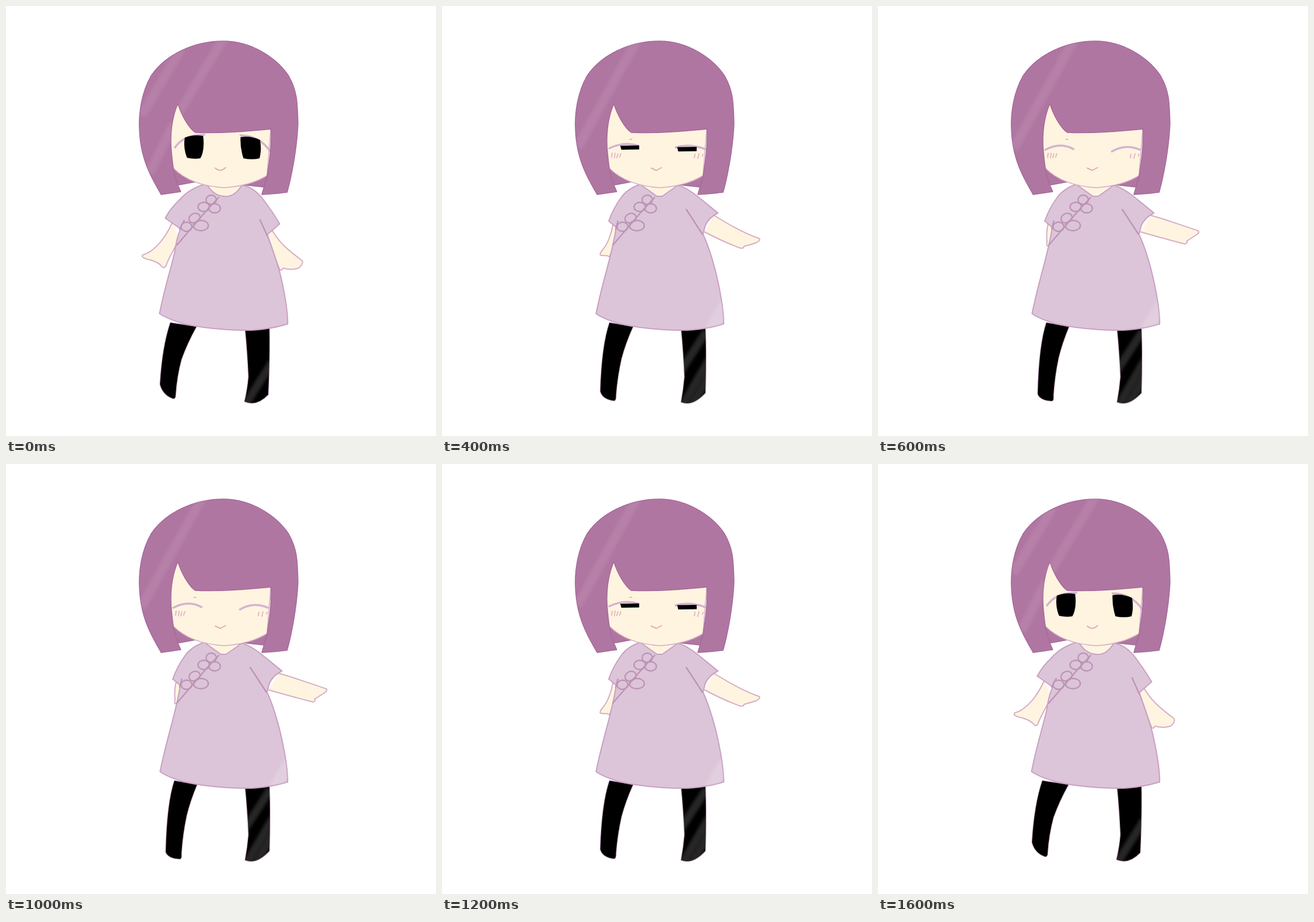
An HTML page that plays this animation: 748x748 px, repeating every 1800 ms.

```html
<!DOCTYPE html>
<html lang="en">
<head>
<meta charset="utf-8">
<title>Welcome gesture</title>
<style>
  html, body { margin: 0; width: 100%; height: 100%; overflow: hidden; background: #fff; }
  svg { display: block; width: 100vw; height: 100vh; }
  path, ellipse { stroke-linecap: round; stroke-linejoin: round; }
  .skin { fill: #fff4e0; stroke: #d5adc6; stroke-width: 2; }
  .leg { fill: #000; stroke: #c9a4c4; stroke-width: 2; paint-order: stroke; }
  .dress { fill: #dcc5d8; stroke: #c8a0c2; stroke-width: 2; }
  .hair { fill: #b076a2; stroke: #a56a99; stroke-width: 1.5; }
  .line { fill: none; stroke: #bd93b7; stroke-width: 2.3; }
  .lid { fill: none; stroke: #d3b3d0; stroke-width: 3.5; }
  .blush { fill: none; stroke: #e3b9c3; stroke-width: 2; }
  .shine { fill: none; stroke: #fff; stroke-linecap: butt; filter: url(#soft); }
</style>
</head>
<body>
<svg viewBox="0 0 748 748">
  <defs>
    <clipPath id="hairClip"><path data-part="hair"/></clipPath>
    <clipPath id="legClip"><path data-part="rightLeg"/></clipPath>
    <clipPath id="dressClip"><path data-part="dress"/></clipPath>
    <filter id="soft" x="-50%" y="-50%" width="200%" height="200%"><feGaussianBlur stdDeviation="2.500"/></filter>
  </defs>

  <path class="leg" data-part="leftLeg"/>
  <path class="leg" data-part="rightLeg"/>
  <g clip-path="url(#legClip)">
    <path class="shine" data-part="legShine" stroke-width="14" opacity=".15"/>
  </g>
  <path class="skin" data-part="leftArm"/>
  <path class="skin" data-part="rightArm"/>
  <path class="skin" style="stroke: none" d="M350 306H412V318L384 333H372L350 318Z"/>
  <path class="dress" data-part="dress"/>
  <g clip-path="url(#dressClip)">
    <path class="shine" data-part="dressShine" stroke-width="22" opacity=".16"/>
  </g>
  <path class="line" data-part="folds"/>
  <g class="line">
    <path d="M370 333Q354 350 345 360Q330 378 297 416"/>
    <ellipse cx="357" cy="337" rx="9" ry="8"/>
    <ellipse cx="344" cy="349.500" rx="10" ry="8"/>
    <ellipse cx="363" cy="352" rx="10" ry="8"/>
    <ellipse cx="328" cy="369" rx="10" ry="8" transform="rotate(-25 328 369)"/>
    <ellipse cx="314" cy="384" rx="9.500" ry="8"/>
    <ellipse cx="339" cy="382" rx="13" ry="9"/>
  </g>

  <path class="hair" d="M285 278L329 306L302 311L290 311ZM454 294L412 311L449 315Z"/>
  <path class="skin" style="stroke-width: 1.5" d="M291 282L284 215L299 165L461 208L454 295Q425 313 380 316Q322 313 291 282Z"/>
  <path class="lid" data-part="lids"/>
  <path data-part="eyes"/>
  <path class="blush" data-part="blush"/>
  <path class="blush" data-part="mouth" style="stroke: #e2abb9"/>
  <path class="hair" data-part="hair"/>
  <g clip-path="url(#hairClip)">
    <path class="shine" data-part="hairShine" stroke-width="16" opacity=".08"/>
  </g>
</svg>
<script>
const hair = "M270 328L304 323C298 310 293 295 291 282C284 240 286 200 299 170C305 190 318 212 329 220" +
  "C375 222 420 218 461 214C462 245 458 270 454 297L445 328Q468 327 489 324C496 300 506 250 508 205" +
  "C507 165 506 147 492 122C473 93 430 61 378 61C325 61 276 86 252 122C236 150 231 185 232 212C233 258 247 290 270 328Z";
const hem = "C278 543 300 550 310 553C350 562 420 568 455 561Q475 558 490 553";

const rest = {
  hair,
  leftLeg: "M286 551Q272 592 268 658Q273 677 291 683Q295 683 295 676Q297 645 305 615Q315 587 331 558Z",
  rightLeg: "M416 560Q420 600 422 645Q420 668 415 688Q436 697 456 676Q459 610 458 560Z",
  leftArm: "M289 377C279 400 260 427 238 433Q233 438 252 442Q266 446 273 455Q278 456 280 447Q288 430 302 405",
  rightArm: "M460 385C476 415 496 428 515 443Q518 448 509 456Q496 460 482 456Q478 463 475 456Q465 430 455 398",
  dress: "M345 310Q317 319 301 338Q286 352 277 369L304 388Q298 398 293 430C286 460 276 490 267 535" + hem +
    "Q490 520 476 462Q465 425 454 398L476 379Q465 360 455 347C440 324 425 313 410 312Q397 333 380 331Q362 330 352 314Z",
  folds: "M310 373L302 388M442 372L454 399",
  eyes: "M311 229Q326 223 343 226Q346 252 338 265Q327 267 315 264Q308 248 311 229Z" +
    "M408 228Q425 225 442 233Q445 250 441 265Q428 268 413 265Q407 246 408 228Z",
  lids: "M294 246Q310 223 345 224M408 225Q440 225 459 252",
  blush: "",
  mouth: "M364 282Q373 290 382 281",
  hairShine: "M382 50L298 190M304 75L236 190M292 205L250 290",
  legShine: "M416 694L464 618",
  dressShine: ""
};

const half = {
  ...rest,
  leftLeg: "M290 551Q276 590 273 665Q276 682 296 686Q300 686 300 676Q303 645 310 615Q318 587 332 558Z",
  rightLeg: "M416 560Q420 600 422 645Q420 668 416 689Q436 697 458 673Q460 610 458 560Z",
  leftArm: "M299 380C297 402 282 430 266 437Q255 446 257 450Q270 452 281 452Q283 456 284 457Q292 430 302 405",
  rightArm: "M472 364C492 386 518 408 547 418Q549 420 541 425Q530 427 514 427Q510 432 503 428Q480 415 457 393",
  dress: "M345 310Q322 318 311 334Q298 352 290 374L303 385Q301 400 295 425C287 460 277 490 268 535" + hem +
    "Q490 520 476 462Q465 420 454 397L458 382Q464 368 480 360C452 338 430 316 410 312L383 331L374 331L350 314Z",
  folds: "M306 374L302 388M425 354L453 397",
  eyes: "M310 240L343 239L343 253L312 254ZM409 242L443 241L443 256L411 257Z",
  lids: "M291 245Q315 235 342 237M406 239Q430 239 460 248",
  blush: "M296 256L295 263M301 256L300 264M306 257L304 264M311 257L309 263M440 258L439 264M447 257L445 265M454 258L453 261M327 232L330 232",
  mouth: "M364 282L373 286L382 281",
  hairShine: "M342 50L236 244",
  legShine: "M408 646L460 566M414 702L470 606M428 708L482 614",
  dressShine: "M466 566L494 518"
};

const smile = {
  ...half,
  leftLeg: "M293 551Q280 590 278 675Q282 686 302 687Q306 687 305 678Q307 645 314 612Q320 587 332 558Z",
  leftArm: "M296 379C293 390 293 400 294 410Q293 414 294 417Q295 417 296 417Q297 417 298 416Q305 410 306 390",
  rightArm: "M474 364C500 371 530 382 557 391Q560 394 554 398Q546 403 537 409Q539 413 534 414Q495 404 457 393",
  eyes: "M310 246L343 246L343 246L312 246ZM409 249L443 249L443 249L411 249Z",
  lids: "M291 250Q318 236 340 249M407 253Q430 239 456 250",
  hairShine: "M346 50L236 248"
};

// Blend two poses whose paths share the same commands.
function blend(from, to, amount) {
  const result = {};
  for (const key in from) {
    const target = to[key].match(/[\d.]+/g) || [];
    let i = 0;
    result[key] = from[key].replace(/[\d.]+/g, n => +n + (target[i++] - n) * amount);
  }
  return result;
}

const between = blend(half, smile, 0.5);
const poses = [rest, half, between, smile, between, smile, between, half, rest];
const parts = document.querySelectorAll("[data-part]");
let shown;

function draw() {
  const pose = poses[Math.floor(performance.now() % 1800 / 200)];
  if (pose !== shown) {
    for (const part of parts) part.setAttribute("d", pose[part.dataset.part]);
    shown = pose;
  }
  requestAnimationFrame(draw);
}
draw();
</script>
</body>
</html>
```
